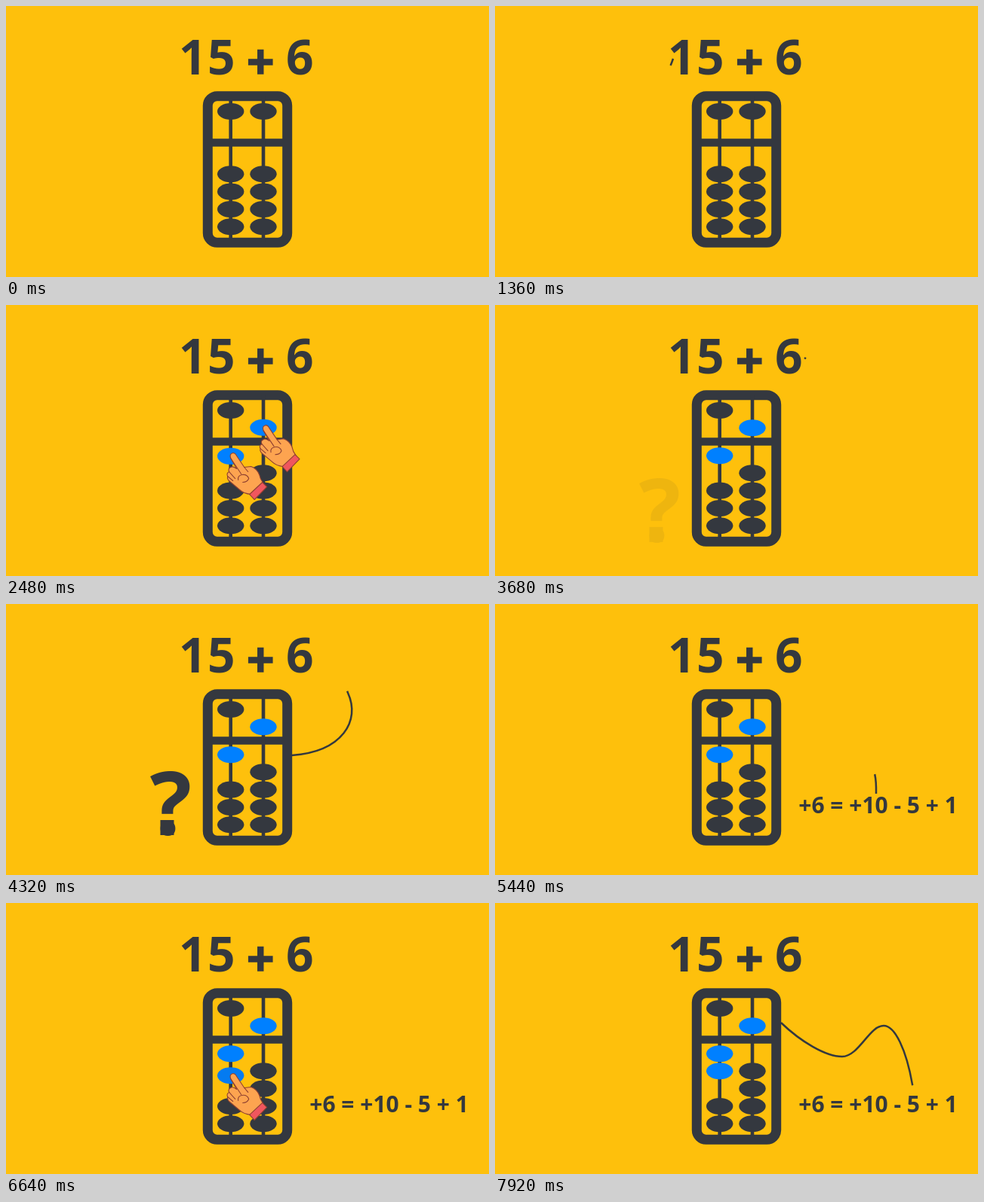
Write an HTML page that moves like this. It is 640 px wide and 360 px high and loops after 8 s.

```html
<!DOCTYPE html>
<html lang="en">
<head>
<meta charset="utf-8">
<title>Abacus sum</title>
<style>
  html, body { margin: 0; width: 100%; height: 100%; overflow: hidden; background: #fec00c; }
  svg { display: block; width: 640px; height: 360px; }
  text { font-family: "Open Sans", "Noto Sans", sans-serif; font-weight: 700; fill: #34383f; }
  .plus { stroke: #34383f; stroke-width: 1.6; }
  .line { fill: none; stroke: #34383f; stroke-width: 2.5; }
</style>
</head>
<body>
<svg viewBox="0 0 640 360" xmlns="http://www.w3.org/2000/svg">
  <defs>
    <g id="hand" stroke="#8f4030" stroke-width="1.1" stroke-linejoin="round" stroke-linecap="round">
      <path fill="#fda450" d="M0 7Q-2 1 3 0Q6 0 8 4L18 19L27 18Q35 21 38 29Q39 35 43 40L27 55Q17 54 12 49L-1 38Q-5 35 -4 31Q-6 27 -2 25Q-4 21 0 19Q3 17 8 21Z"/>
      <path fill="none" d="M0 7L14 28M-2 25L6 34M-4 31L3 37M10 36Q9 30 15 29Q22 28 24 34Q22 39 16 39M18 19L23 25"/>
      <path fill="#f0565e" d="M42 39L48 45L31.5 62L25 55Z"/>
    </g>
  </defs>
  <rect width="640" height="360" fill="#fec00c"/>
  <text y="91" font-size="64"><tspan x="229">1</tspan><tspan x="267">5</tspan> <tspan class="plus" x="319" dy="5.5">+</tspan> <tspan x="371" dy="-5.5">6</tspan></text>
  <g id="ask">
    <text x="190.7" y="306" font-size="116">?</text>
    <rect x="204.5" y="287" width="18" height="20" fill="#34383f"/>
  </g>
  <text id="rule" x="402.3" y="278" font-size="30">+6 = +10 - 5 + 1</text>
  <g id="lines"></g>
  <g stroke="#34383f" fill="none">
    <rect x="267.3" y="119.7" width="105.4" height="194.6" rx="12.5" stroke-width="13"/>
    <path d="M267 181.5H373" stroke-width="10.5"/>
    <path d="M297.7 120V314M341 120V314" stroke-width="4.6"/>
  </g>
  <g id="beads"></g>
  <g id="hands"></g>
</svg>
<script>
const LOOP = 8000, LEFT = 297.7, RIGHT = 341;
const DARK = [52, 56, 63], BLUE = [0, 128, 255];
const $ = id => document.getElementById(id);

function add(parent, tag, attrs) {
  const el = document.createElementNS("http://www.w3.org/2000/svg", tag);
  for (const key in attrs) el.setAttribute(key, attrs[key]);
  return $(parent).appendChild(el);
}

const clamp = v => Math.min(1, Math.max(0, v));
const ramp = (t, start, span) => clamp((t - start) / span);
const ease = (t, start, span) => (1 - Math.cos(Math.PI * ramp(t, start, span))) / 2;
const mix = (a, b, k) => a + (b - a) * k;

// Pointer lines: drawn from the text to the abacus, then wiped the same way.
const lines = [
  { draw: 1290, wipe: 1820, d: "M236 70Q230 88 222 97C194 132 196 186 262 186" },
  { draw: 3650, wipe: 4180, d: "M410 70Q442 90 453 118C470 155 446 196 379 201" },
  { draw: 5325, wipe: 5910, d: "M505 252C506 205 495 186 379 186" },
  { draw: 7310, wipe: 7865, d: "M556 257L553 241C545 195 530 163 515 163C496 163 482 204 460 204C438 204 405 184 379 159" }
];
for (const l of lines) l.el = add("lines", "path", { d: l.d, class: "line", pathLength: 1 });

const bead = (x, y) => add("beads", "ellipse", { cx: x, cy: y, rx: 17.7, ry: 11, fill: "#34383f" });
bead(LEFT, 140);
for (const y of [270, 293.3]) bead(LEFT, y);
for (const y of [223.3, 246.6, 270, 293.3]) bead(RIGHT, y);

// gap: distance from bead centre to fingertip at start and end of the push
const pushes = [
  { x: LEFT, from: 223.3, to: 200.3, start: 1722, show: 1680, hide: 2590, gap: [2.5, -4.5] },
  { x: RIGHT, from: 140, to: 163.3, start: 1722, show: 1680, hide: 2590, gap: [-6, -3] },
  { x: LEFT, from: 246.6, to: 223.3, start: 6084, show: 6000, hide: 6870, gap: [2, -4.5] }
];
for (const p of pushes) {
  p.bead = bead(p.x, p.from);
  p.hand = add("hands", "use", { href: "#hand" });
}

function render(t) {
  for (const l of lines) {
    const head = ease(t, l.draw, 450), tail = ease(t, l.wipe, 370);
    l.el.style.display = head - tail > 0.002 ? "" : "none";
    l.el.setAttribute("stroke-dasharray", `${head - tail} 2`);
    l.el.setAttribute("stroke-dashoffset", -tail);
  }
  for (const p of pushes) {
    const k = ease(t, p.start, 842), y = mix(p.from, p.to, k), tint = clamp(k * 1.25);
    p.bead.setAttribute("cy", y);
    p.bead.setAttribute("fill", `rgb(${DARK.map((c, i) => Math.round(mix(c, BLUE[i], tint)))})`);
    p.hand.setAttribute("transform", `translate(${p.x} ${y + mix(...p.gap, k)})`);
    p.hand.setAttribute("opacity", ramp(t, p.show, 180) * (1 - ramp(t, p.hide, 200)));
  }
  $("ask").setAttribute("opacity", ramp(t, 3660, 280) * (1 - ramp(t, 4900, 300)));
  $("ask").setAttribute("transform", `translate(0 ${8 * (1 - ease(t, 3660, 280))})`);
  $("rule").setAttribute("opacity", ramp(t, 4920, 340));
}

const origin = performance.now();
function tick() {
  render((performance.now() - origin) % LOOP);
  requestAnimationFrame(tick);
}
render(0);
requestAnimationFrame(tick);
</script>
</body>
</html>
```
